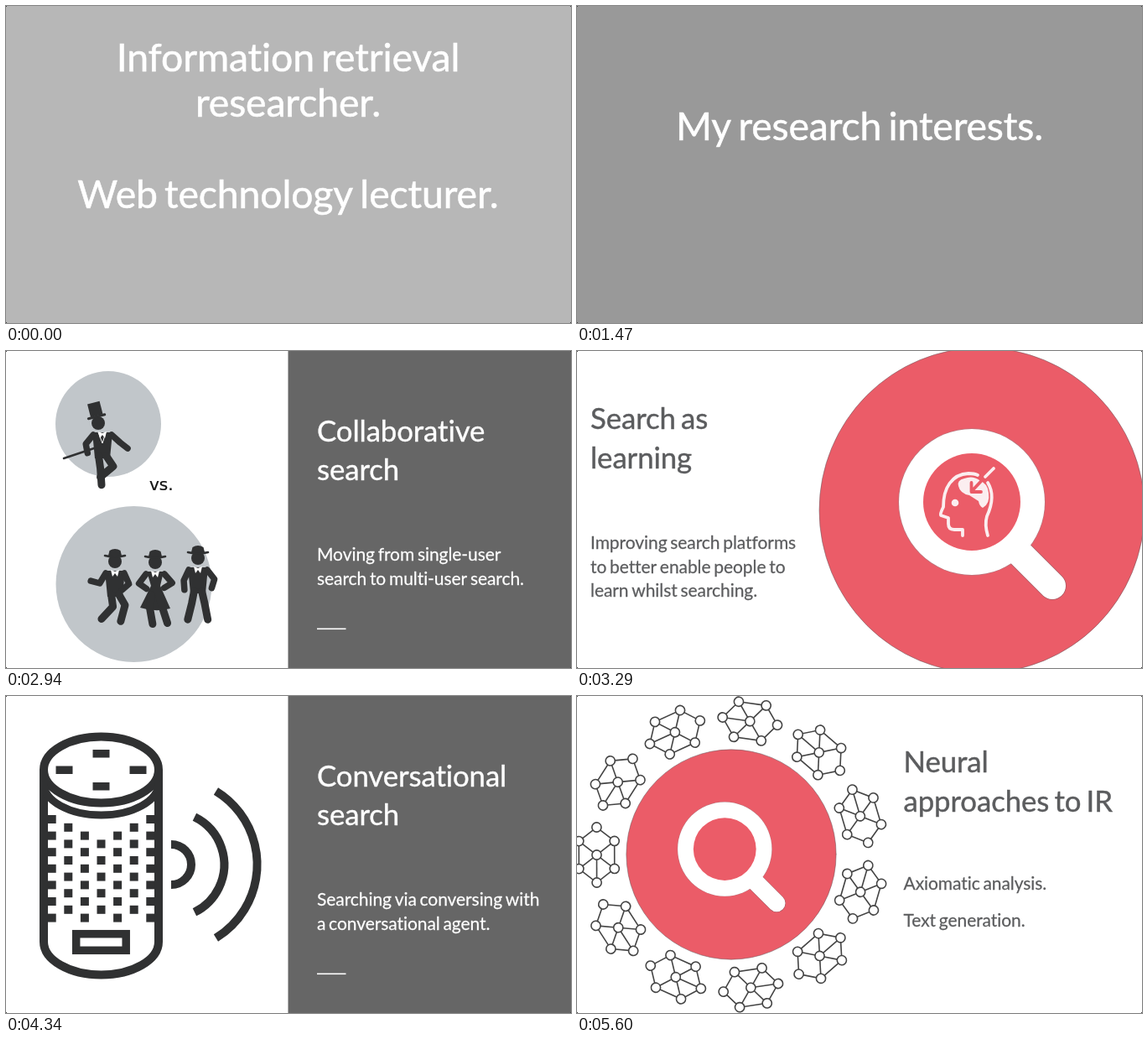
An HTML page with a canvas that plays this animation: 674 by 378 pixels, repeating every 5.67 s.

```html
<!DOCTYPE html>
<html lang="en">
<head>
<meta charset="utf-8">
<title>Research slides</title>
<style>
html, body { margin: 0; width: 100%; height: 100%; overflow: hidden; background: #fff; }
canvas { display: block; }
</style>
</head>
<body>
<canvas id="stage" width="674" height="378"></canvas>
<script>
const W = 674, H = 378, LOOP = 5670, TURN = Math.PI * 2;
const BIG = 46.4, TITLE = 34.8, BODY = 21;
const DARK = '#303132', RED = '#eb5c68', GREY = '#5b5c5e', PALE = '#c1c6ca';
const ctx = document.getElementById('stage').getContext('2d');
const rad = degrees => degrees * Math.PI / 180;

function fill(color, x = 0, y = 0, w = W, h = H) {
  ctx.fillStyle = color;
  ctx.fillRect(x, y, w, h);
}

// A hairline outline gives the slightly heavy look of smoothed type
function text(lines, x, y, size, pitch, color, align = 'left', family = 'Lato') {
  ctx.font = `${size}px "${family}", sans-serif`;
  ctx.letterSpacing = `${-0.003 * size}px`;
  ctx.wordSpacing = `${-0.075 * size}px`;
  ctx.textAlign = align;
  ctx.fillStyle = ctx.strokeStyle = color;
  ctx.lineWidth = 0.012 * size;
  lines.forEach((line, i) => {
    ctx.fillText(line, x, y + i * pitch);
    ctx.strokeText(line, x, y + i * pitch);
  });
}

function disc(x, y, r, color) {
  ctx.beginPath();
  ctx.arc(x, y, r, 0, TURN);
  ctx.fillStyle = color;
  ctx.fill();
}

function line(color, width, ...points) {
  ctx.beginPath();
  points.forEach(([x, y]) => ctx.lineTo(x, y));
  ctx.strokeStyle = color;
  ctx.lineWidth = width;
  ctx.stroke();
}

function strokePath(d, color, width) {
  ctx.strokeStyle = color;
  ctx.lineWidth = width;
  ctx.stroke(new Path2D(d));
}

function fillPath(d, color) {
  ctx.fillStyle = color;
  ctx.fill(new Path2D(d));
}

function scoped(draw) {
  ctx.save();
  draw();
  ctx.restore();
}

function rounded(draw) {
  scoped(() => {
    ctx.lineCap = ctx.lineJoin = 'round';
    draw();
  });
}

function panel(title, body) {
  fill('#fff');
  fill('#666', 336.5, 0, W - 336.5, H);
  text(title, 371, 107.5, TITLE, 46.5, '#fff');
  text(body, 371, 250, BODY, 28.5, '#fff');
  fill('#fff', 371, 330.5, 34.5, 1.6);
}

// Two segments; angles are measured from straight down, positive to the right
function limb(x, y, angles, lengths, width) {
  const points = [[x, y]];
  angles.forEach((angle, i) => {
    x += lengths[i] * Math.sin(rad(angle));
    y += lengths[i] * Math.cos(rad(angle));
    points.push([x, y]);
  });
  line(DARK, width, ...points);
}

const bowler = () => {
  fillPath('M-8 -7 l1.5 -6 q6.5 -4 13 0 l1.5 6 z', DARK);
  strokePath('M-12 -7 q12 3 24 0', DARK, 2.6);
};

const topHat = () => {
  ctx.rotate(-0.25);
  fill(DARK, -7, -25, 15, 16);
  line(DARK, 3, [-10, -8], [10, -8]);
};

// The origin is the centre of the head; arms and legs list joint angles, left then right
function dancer(x, y, { hat = bowler, lean = 0, skirt, arms, legs }) {
  scoped(() => {
    ctx.translate(x, y);
    disc(0, 0, 8, DARK);
    scoped(hat);
    ctx.translate(lean, 0);
    fillPath(skirt
      ? 'M-10 11 H10 L6 28 L18 55 Q0 60 -18 54 L-5 28 Z'
      : 'M-12 11 H12 L9 42 H-9 Z', DARK);
    [-1, 1].forEach((side, i) => {
      limb(side * 11, 14, arms[i], [14, 11], 7.5);
      limb(side * 4.5, 39, legs[i], [15, 20], 9);
    });
    fillPath('M-5 10 L0 12 L5 10 L3 18 L0 14 L-3 18 Z', '#fff');
  });
}

function dancers() {
  line(DARK, 2.5, [69, 128], [105, 116]);
  dancer(110, 86, {
    hat: topHat, lean: 5,
    arms: [[-39, 11], [48, 52]], legs: [[8, 4], [34, -50]]
  });
  line('#fff', 1, [110, 97], [115, 110], [119, 97]);
  dancer(130, 251, { arms: [[-31, -105], [24, -49]], legs: [[8, -43], [30, -15]] });
  dancer(178, 252, { skirt: true, arms: [[-37, 55], [41, -58]], legs: [[-8, 10], [15, 18]] });
  dancer(229, 247, { arms: [[-25, 4], [38, -17]], legs: [[-11, -14], [13, 11]] });
}

function collaborative() {
  panel(['Collaborative', 'search'], ['Moving from single-user', 'search to multi-user search.']);
  disc(122, 87, 63, PALE);
  disc(152.5, 278, 93, PALE);
  rounded(dancers);
  text(['vs.'], 171, 166, 20, 0, '#111', 'left', 'DejaVu Sans');
}

// Magnifier inside a red disc; at scale 1 the disc has radius 194
function magnifier(x, y, scale) {
  const edge = 'rgba(110,90,95,.55)', handle = [[40, 46], [84, 90]];
  rounded(() => {
    ctx.translate(x, y);
    ctx.scale(scale, scale);
    disc(0, 0, 194, RED);
    ctx.strokeStyle = edge;
    ctx.lineWidth = 1 / scale;
    ctx.stroke();
    line(edge, 33.5, ...handle);
    disc(-12, -10, 87.7, '#b8747c');
    line('#fff', 32, ...handle);
    disc(-12, -10, 87, '#fff');
    disc(-12, -10, 58, RED);
  });
}

function headIcon() {
  const pale = '#fbeef0';
  strokePath('M460 220 V213 H450 Q443 213 443 206 V199 L434 196 Q433 194 437 186 ' +
    'C437 163 447 147 467 146 Q474 146 478 148', pale, 3.8);
  strokePath('M490 157 C498 170 495 184 489 197 Q486 207 490 220', pale, 3.8);
  fillPath('M455 161 Q453 154 462 152 Q472 148 480 154 Q490 158 491 169 ' +
    'Q493 182 484 187 Q480 185 479 179 L468 172 Q457 170 455 161 Z', pale);
  strokePath('M487 150 L471 167 M470.5 157 V168 H482', RED, 3.8);
  line(pale, 3.8, [497, 140], [487, 150]);
  disc(451, 181, 4.3, pale);
}

function learning() {
  fill('#fff');
  text(['Search as', 'learning'], 16, 93, TITLE, 46.5, GREY);
  text(['Improving search platforms', 'to better enable people to', 'learn whilst searching.'],
    16, 236, BODY, 28.5, GREY);
  magnifier(483, 190, 1);
  rounded(headIcon);
}

function speaker() {
  const cx = 113.5, step = 19.6;
  strokePath('M45 88 V293 A68.5 39.5 0 0 0 182 293 V88', DARK, 10);
  ctx.beginPath();
  ctx.ellipse(cx, 88, 68.5, 39.5, 0, 0, TURN);
  ctx.stroke();
  strokePath('M45 104 A68.5 38 0 0 0 182 104', DARK, 9);

  for (let i = 0; i < 4; i++) {
    const a = i * TURN / 4;
    fill(DARK, cx - 10 + 44 * Math.cos(a), 83.5 + 19.5 * Math.sin(a), 20, 9.5);
  }

  // Staggered grille, mirrored about the middle column
  for (let col = -3; col <= 3; col++) {
    const top = 147 + (3 - Math.abs(col)) * step / 2;
    for (let y = top; y < 266; y += step) fill(DARK, cx + col * step - 5, y - 5, 10, 10);
  }
  ctx.lineWidth = 9.5;
  ctx.strokeRect(83.7, 283.7, 59.5, 19.6);

  // Sound waves narrow as they spread
  ctx.lineWidth = 10;
  for (let i = 0; i < 3; i++) {
    const half = 1 + 0.57 * 0.2 ** i;
    ctx.beginPath();
    ctx.arc(197, 201, 24 + 39.3 * i, -half, half);
    ctx.stroke();
  }
}

function conversational() {
  panel(['Conversational', 'search'], ['Searching via conversing with', 'a conversational agent.']);
  speaker();
}

// Stretched hexagon with a hub, linked to every node but the first
function network() {
  const nodes = Array.from({ length: 6 }, (_, i) => {
    const a = i * TURN / 6;
    return [24.5 * Math.sin(a), -33 * Math.cos(a)];
  });
  line('#444', 1.6, ...nodes, nodes[0]);
  nodes.slice(1).forEach(node => line('#444', 1.6, [0, 0], node));
  [...nodes, [0, 0]].forEach(([x, y]) => {
    disc(x, y, 5.6, '#fff');
    ctx.stroke();
  });
}

function networkRing(x, y, radius, count) {
  for (let i = 0; i < count; i++) {
    scoped(() => {
      ctx.translate(x, y);
      ctx.rotate(rad(8) + i * TURN / count);
      ctx.translate(0, -radius);
      ctx.rotate(TURN / 4);
      network();
    });
  }
}

function neural() {
  fill('#fff');
  networkRing(184, 189, 160.5, 11);
  magnifier(184, 189, 0.645);
  text(['Neural', 'approaches to IR'], 389.5, 91, TITLE, 47, GREY);
  text(['Axiomatic analysis.', 'Text generation.'], 389.5, 231, BODY, 43.5, GREY);
}

function intro() {
  fill('#b7b7b7');
  text(['Information retrieval', 'researcher.', '', 'Web technology lecturer.'],
    336.5, 78, BIG, 54.4, '#fff', 'center');
}

function interests() {
  fill('#999');
  text(['My research interests.'], 337, 160, BIG, 0, '#fff', 'center');
}

function corners() {
  for (const x of [0, W - 1]) for (const y of [0, H - 1]) fill('#444', x, y, 1, 1);
}

const slides = [
  { from: 0, draw: intro },
  { from: 1470, draw: interests },
  { from: 2100, draw: collaborative },
  { from: 3080, draw: learning },
  { from: 3990, draw: conversational },
  { from: 5110, draw: neural }
];

const start = performance.now();
function frame(now) {
  const t = Math.max(0, now - start) % LOOP;
  slides.findLast(slide => slide.from <= t).draw();
  corners();
  requestAnimationFrame(frame);
}
frame(start);
</script>
</body>
</html>
```
